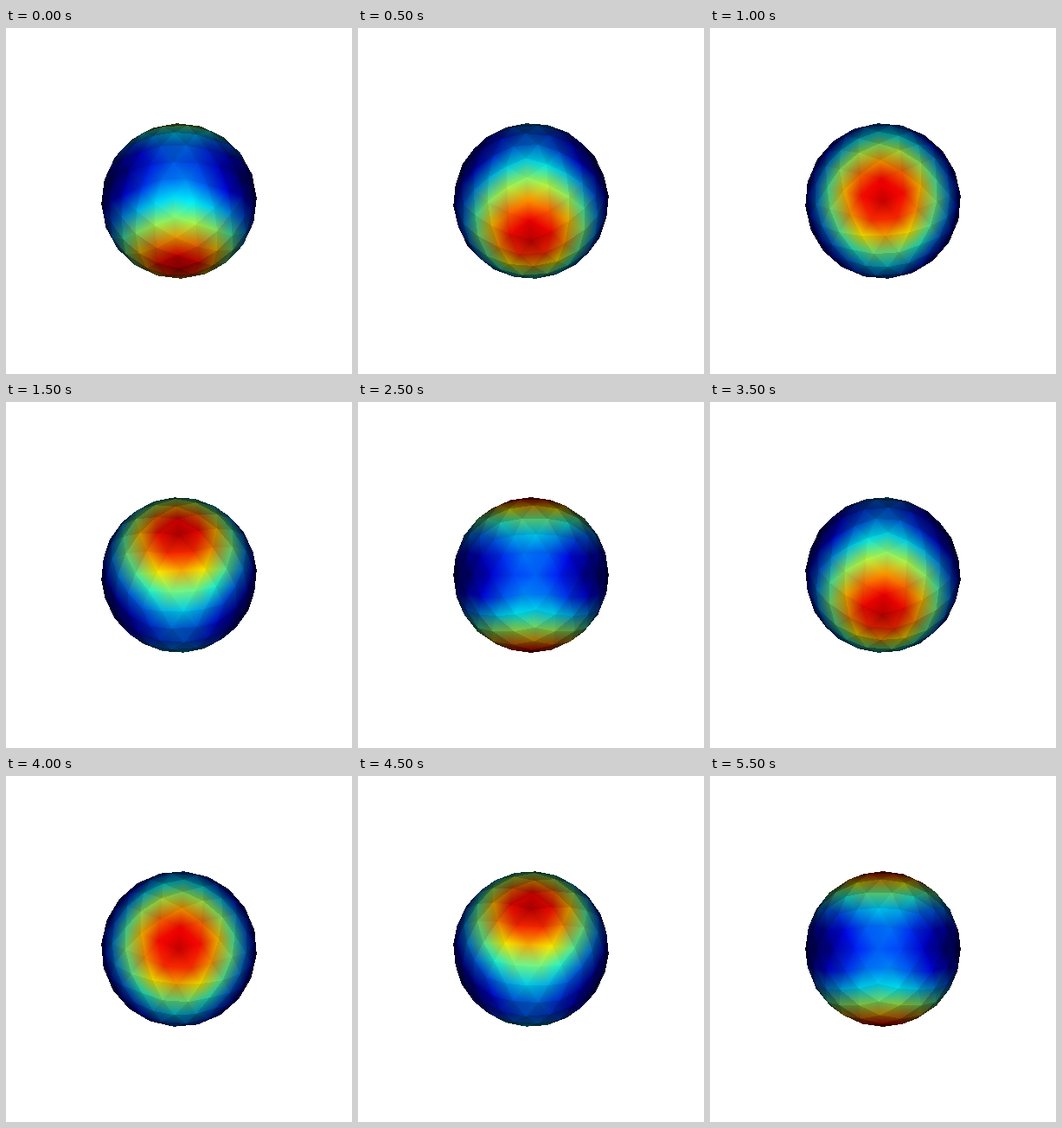
Recreate the animation shown at these times as an HTML page with a canvas. Size 400 by 400 pixels, loop 6 s.

```html
<!DOCTYPE html>
<html lang="en">
<head>
<meta charset="utf-8">
<title>Turning sphere</title>
<style>
  html, body { margin: 0; width: 100%; height: 100%; overflow: hidden; background: #fff; }
  canvas { display: block; width: 400px; height: 400px; }
</style>
</head>
<body>
<canvas id="stage" width="400" height="400"></canvas>
<script>
const SIZE = 400, MID = 200, R = 90, STEP = 500, STEPS = 12;
const RAD = Math.PI / 180;
const ctx = document.getElementById('stage').getContext('2d');

const unit = v => { const n = Math.hypot(...v); return v.map(c => c / n); };
const mid = (a, b) => unit(a.map((c, i) => c + b[i]));

// Icosahedron, each face split in four twice
function icosphere() {
  const ring = (turn, z) => Array.from({ length: 5 }, (_, k) => {
    const a = (turn + 72 * k) * RAD;
    return unit([2 * Math.cos(a), 2 * Math.sin(a), z]);
  });
  const up = ring(94, 1), low = ring(130, -1);
  let faces = [];
  for (let k = 0; k < 5; k++) {
    const n = (k + 1) % 5;
    faces.push([[0, 0, 1], up[k], up[n]], [up[k], low[k], up[n]],
               [low[k], low[n], up[n]], [[0, 0, -1], low[n], low[k]]);
  }
  for (let i = 0; i < 2; i++) {
    faces = faces.flatMap(([a, b, c]) => {
      const d = mid(a, b), e = mid(b, c), f = mid(c, a);
      return [[a, d, f], [d, b, e], [f, e, c], [d, e, f]];
    });
  }
  return faces;
}

// Two hot poles, a cool belt and cold lobes at the sides
function heat([x, y, z]) {
  const s = Math.sin(3 * RAD), c = Math.cos(3 * RAD);
  const pole = (y * s + z * c) ** 2, front = (y * c - z * s) ** 2, side = x * x;
  return 0.03 + 0.19 * front + 0.64 * pole + 0.26 * pole * pole
    + side * (0.25 * pole - 0.35 * front);
}

const band = (v, centre) => Math.max(0, Math.min(1, 1.5 - Math.abs(4 * v - centre)));
const jet = v => [band(v, 3), band(v, 2), band(v, 1)];

const mesh = icosphere().map(points => ({ points, colours: points.map(p => jet(heat(p))) }));

function turn([x, y, z], angle) {
  const s = Math.sin(angle), c = Math.cos(angle);
  return [x, y * c + z * s, z * c - y * s];
}

function fillFace(data, pts, [p, q, r], light) {
  const [[ax, ay], [bx, by], [cx, cy]] = pts;
  const area = (by - cy) * (ax - cx) + (cx - bx) * (ay - cy);
  if (Math.abs(area) < 1e-6) return;
  const xs = [ax, bx, cx], ys = [ay, by, cy];
  const x1 = Math.ceil(Math.max(...xs)), y1 = Math.ceil(Math.max(...ys));
  for (let y = Math.floor(Math.min(...ys)); y < y1; y++) {
    for (let x = Math.floor(Math.min(...xs)); x < x1; x++) {
      const dx = x + 0.5 - cx, dy = y + 0.5 - cy;
      const u = ((by - cy) * dx + (cx - bx) * dy) / area;
      const v = ((cy - ay) * dx + (ax - cx) * dy) / area;
      const w = 1 - u - v;
      if (Math.min(u, v, w) < -1e-6) continue;
      const i = 4 * (y * SIZE + x);
      for (let k = 0; k < 3; k++) {
        data[i + k] = 255 * light * (u * p[k] + v * q[k] + w * r[k]);
      }
    }
  }
}

function draw(step) {
  const image = ctx.createImageData(SIZE, SIZE);
  image.data.fill(255);
  const angle = (step - 2) * 30 * RAD;
  for (const { points, colours } of mesh) {
    const p = points.map(q => turn(q, angle));
    const [a, b, c] = p;
    const facing = unit(a.map((v, i) => v + b[i] + c[i]))[2];
    const visible = (b[0] - a[0]) * (c[1] - a[1]) - (b[1] - a[1]) * (c[0] - a[0]) > 0;
    if (!visible) continue;
    const light = 0.12 + 0.86 * Math.max(0, facing);
    fillFace(image.data, p.map(([x, y]) => [MID + R * x, MID - R * y]), colours, light);
  }
  ctx.putImageData(image, 0, 0);
}

let shown = -1;
const start = performance.now();
function tick() {
  const step = Math.floor((performance.now() - start) / STEP) % STEPS;
  if (step !== shown) draw(shown = step);
  requestAnimationFrame(tick);
}
tick();
</script>
</body>
</html>
```
